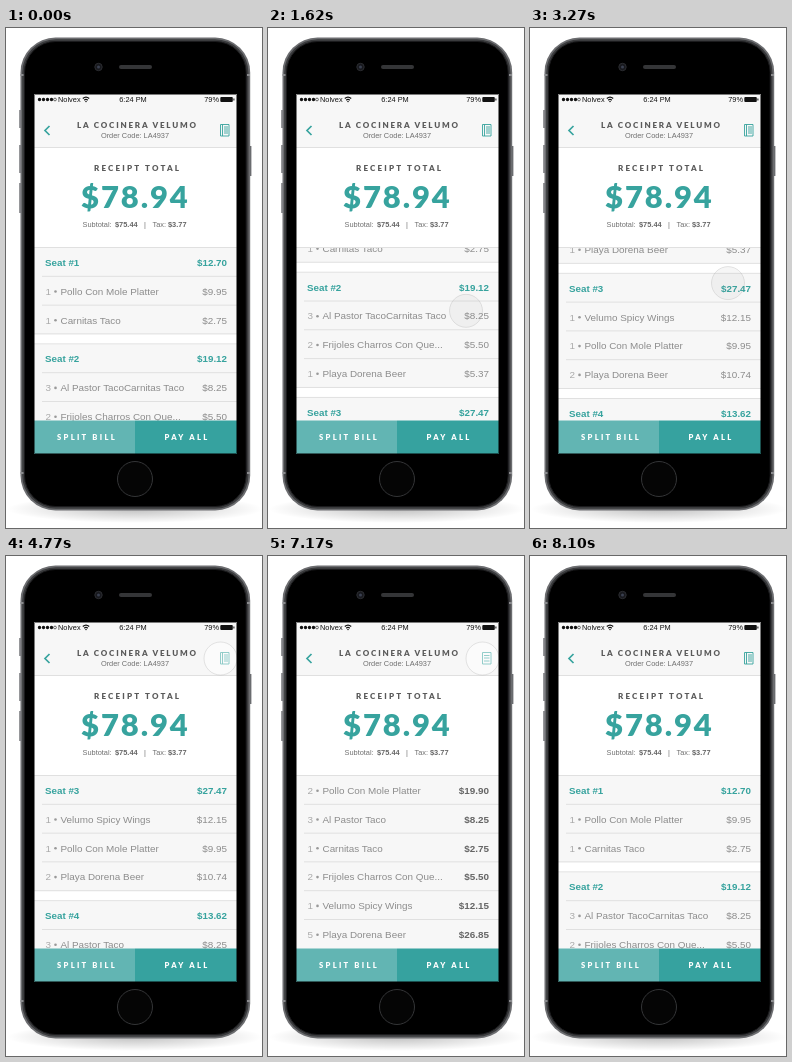
An HTML page that plays this animation: 256x500 px, repeating every 8.13 s.

```html
<!DOCTYPE html>
<html lang="en">
<head>
<meta charset="utf-8">
<title>Receipt</title>
<style>
html, body { margin: 0; width: 256px; height: 500px; overflow: hidden; background: #fff; }
svg { position: absolute; left: 0; top: 0; display: block; }
text { font-family: "Liberation Sans", Arial, sans-serif; white-space: pre; }
.caps { font: 900 8px Lato, sans-serif; letter-spacing: 2.2px; fill: #5a5a5a; }
.title { letter-spacing: 1.8px; }
.button { font-size: 7.6px; letter-spacing: 2.3px; fill: #fff; }
.total { font: 900 31px Lato, sans-serif; letter-spacing: 1.9px; fill: #37a39e; }
.small { font-size: 7.4px; fill: #707070; }
.row { font-size: 9.9px; fill: #8c8c8c; }
.seat { font-size: 9.8px; font-weight: 700; fill: #37a39e; }
.strong { font-weight: 700; fill: #666; }
.qty { fill: #aaa; }
.status { font-size: 7.4px; fill: #111; }
.line { stroke: #e0e0e0; }
.icon { fill: none; stroke: #37a39e; }
.swipe { fill: #808080; fill-opacity: .07; }
.tap { fill: #fff; fill-opacity: .4; }
#screen { position: absolute; left: 28px; top: 66px; width: 203px; height: 360px;
  overflow: hidden; background: #fff; perspective: 527px; }
.page { position: absolute; inset: 0; }
</style>
</head>
<body>
<svg width="256" height="500">
  <defs>
    <radialGradient id="shadow">
      <stop offset="0" stop-color="#000" stop-opacity=".25"/><stop offset="1" stop-color="#000" stop-opacity="0"/>
    </radialGradient>
  </defs>
  <ellipse cx="129" cy="481" rx="128" ry="14" fill="url(#shadow)"/>
  <path d="M14 82v18M14 117v28M14 155v30M244.700 118v30" stroke="#6b6c70" stroke-width="1.400"/>
  <rect x="14.500" y="9.500" width="229.700" height="473" rx="35" fill="#6c6d70"/>
  <rect x="16.200" y="11.200" width="226.300" height="469.600" rx="33.500" fill="#3a3b3d"/>
  <path d="M14.500 47h3M241 47h3M14.500 445h3M241 445h3" stroke="#8a8b8e" stroke-width="2"/>
  <rect x="18.500" y="13.500" width="221.700" height="465" rx="31" stroke="#1b1b1d"/>
  <circle cx="92.500" cy="39" r="3.700" fill="#17181d" stroke="#2c2d31"/>
  <circle cx="92.500" cy="39" r="1.500" fill="#3a4050"/>
  <rect x="113" y="37" width="33" height="4" rx="2" fill="#343537"/>
  <circle cx="129" cy="451" r="17.500" fill="#050505" stroke="#343537"/>
</svg>

<div id="screen">
  <div class="page" id="front"></div>
  <div class="page" id="back"></div>
</div>

<svg width="256" height="500">
  <clipPath id="glass"><path d="M28 66h203v360H28z"/></clipPath>
  <g clip-path="url(#glass)">
    <circle id="touch" r="16.500" stroke="#808080" stroke-opacity=".2"/>
  </g>
  <path d="M28.500 66.500h202v359h-202z" fill="none" stroke="#000" stroke-opacity=".5"/>
  <path d="M33.500 71.500h.01M37.500 71.500h.01M41.500 71.500h.01M45.500 71.500h.01" stroke="#111" stroke-width="3.400" stroke-linecap="round"/>
  <circle cx="49" cy="71.500" r="1.400" fill="none" stroke="#111" stroke-width=".6"/>
  <text x="52" y="74.200" class="status">Nolvex</text>
  <text x="127" y="74.200" class="status" text-anchor="middle">6:24 PM</text>
  <text x="213" y="74.200" class="status" text-anchor="end">79%</text>
  <path d="M76.800 70.500q3.200-2.800 6.400 0M78.200 72.200q1.800-1.500 3.600 0" fill="none" stroke="#111" stroke-width="1.200"/>
  <path d="M79 73l1 1.400l1-1.400zM227.400 70.500h1v2h-1z" fill="#111"/>
  <rect x="214.300" y="69" width="12.500" height="5" rx="1" fill="#111"/>
</svg>

<script>
const LOOP = 8130, ROW = 28.8, GAP = 10, TOP = 220;
const $ = id => document.getElementById(id);

const wings = "Velumo Spicy Wings", beer = "Playa Dorena Beer", platter = "Pollo Con Mole Platter",
  beans = "Frijoles Charros Con Que...", pastor = "Al Pastor Taco", carnitas = "Carnitas Taco";
const seats = [
  ["12.70", [1, platter, "9.95"], [1, carnitas, "2.75"]],
  ["19.12", [3, pastor + carnitas, "8.25"], [2, beans, "5.50"], [1, beer, "5.37"]],
  ["27.47", [1, wings, "12.15"], [1, platter, "9.95"], [2, beer, "10.74"]],
  ["13.62", [3, pastor, "8.25"], [1, beer, "5.37"]],
];
const summary = [
  [2, platter, "19.90"], [3, pastor, "8.25"], [1, carnitas, "2.75"],
  [2, beans, "5.50"], [1, wings, "12.15"], [5, beer, "26.85"],
];

const text = (x, y, cls, str, anchor = "start") =>
  `<text x="${x}" y="${y}" class="${cls}" text-anchor="${anchor}">${str}</text>`;
const line = (x, y) => `<path class="line" d="M${x} ${y - .5}H231"/>`;
const band = (y, rows) => `<rect x="28" y="${y}" width="203" height="${rows * ROW}" fill="#f7f7f7"/>`;

const itemRow = ([qty, name, price], y, priceClass) =>
  text(39.5, y + 18, "row qty", qty) +
  `<circle cx="49.500" cy="${y + 14.7}" r="1.300" fill="#999"/>` +
  text(54.5, y + 18, "row", name) +
  text(221, y + 18, "row " + priceClass, "$" + price, "end");

function seatList() {
  let y = TOP, out = "";
  seats.forEach(([sum, ...items], i) => {
    out += band(y, items.length + 1) + line(28, y) +
      text(39, y + 18, "seat", "Seat #" + (i + 1)) + text(221, y + 18, "seat", "$" + sum, "end");
    for (const item of items) {
      y += ROW;
      out += line(36, y) + itemRow(item, y, "");
    }
    y += ROW;
    out += line(28, y);
    y += GAP;
  });
  return `<g id="list">${out}</g>`;
}

const summaryList = () => band(TOP, summary.length) + summary.map((item, i) =>
  line(i ? 36 : 28, TOP + i * ROW) + itemRow(item, TOP + i * ROW, "strong")).join("");

const page = (list, icon) => `<svg width="203" height="360" viewBox="28 66 203 360">
  <path d="M28 66h203v360H28z" fill="#fff"/>${list}
  <path d="M28 119h203v101H28z" fill="#fff"/>${line(28, TOP)}
  <path d="M28 66h203v53H28z" fill="#f7f7f7"/>${line(28, 120)}
  <path class="icon" d="M43.500 98l-4.500 4.500l4.500 4.500" stroke-width="1.700"/>
  <path class="icon" d="M214.500 96.500h8.500v11.500h-8.500z${icon}" stroke-width=".9"/>
  ${text(71, 100, "caps title", "LA COCINERA VELUMO")}
  ${text(129, 110, "small", "Order Code: LA4937", "middle")}
  ${text(88, 143, "caps", "RECEIPT TOTAL")}
  ${text(75, 180, "total", "$78.94")}
  ${text(76.5, 199, "small", "Subtotal:")}${text(109, 199, "small strong", "$75.44")}
  ${text(138, 199, "small", "|")}${text(146.5, 199, "small", "Tax:")}${text(162, 199, "small strong", "$3.77")}
  <path d="M28 392.500h101v33.500H28z" fill="#62b5b3"/><path d="M129 392.500h102v33.500H129z" fill="#36a29f"/>
  ${text(51, 412, "caps button", "SPLIT BILL")}${text(158.5, 412, "caps button", "PAY ALL")}
</svg>`;

$("front").innerHTML = page(seatList(), "M216.500 96.500v11.500M218 99h4M218 101h4M218 103h4M218 105h4");
$("back").innerHTML = page(summaryList(), "M216 99.500h5.500M216 102h5.500M216 105h5.500");

const clamp = x => Math.min(1, Math.max(0, x));
const span = (t, from, to) => clamp((t - from) / (to - from));
const smooth = x => x * x * (3 - 2 * x);
const flip = (t, start) => smooth(span(t, start, start + 750) ** 1.55);

const swipes = [
  { start: 1260, move: 1320, end: 1770, fadeIn: 1, distance: 3 * ROW + GAP },
  { start: 2880, move: 2910, end: 3420, fadeIn: 60, distance: 4 * ROW + GAP },
];
const taps = [4770, 7170];

function setTouch(kind, x, y, opacity) {
  const touch = $("touch");
  touch.setAttribute("class", kind);
  touch.setAttribute("cx", x);
  touch.setAttribute("cy", y);
  touch.setAttribute("opacity", opacity);
}

function draw(t) {
  let scroll = 0;
  setTouch("", 0, 0, 0);
  for (const s of swipes) {
    const moved = s.distance * smooth(span(t, s.move, s.end));
    scroll += moved;
    if (t >= s.start && t < s.end) {
      const fadeIn = .4 + .6 * span(t, s.start, s.start + s.fadeIn);
      setTouch("swipe", 198, 354.5 - moved, fadeIn * (1 - span(t, s.end - 150, s.end)));
    }
  }
  for (const tap of taps)
    if (t >= tap && t < tap + 330) setTouch("tap", 214.5, 102.5, 1 - span(t, tap + 180, tap + 330));

  if (t >= 5700) scroll = 0;
  $("list").setAttribute("transform", `translate(0 ${-scroll})`);

  const angle = 180 * (flip(t, 4950) - flip(t, 7350));
  const showBack = angle > 90;
  $("front").style.display = showBack ? "none" : "";
  $("back").style.display = showBack ? "" : "none";
  $("front").style.transform = angle ? `rotateY(${-angle}deg)` : "none";
  $("back").style.transform = angle < 180 ? `rotateY(${180 - angle}deg)` : "none";
}

function tick() {
  draw(performance.now() % LOOP);
  requestAnimationFrame(tick);
}
tick();
</script>
</body>
</html>
```
